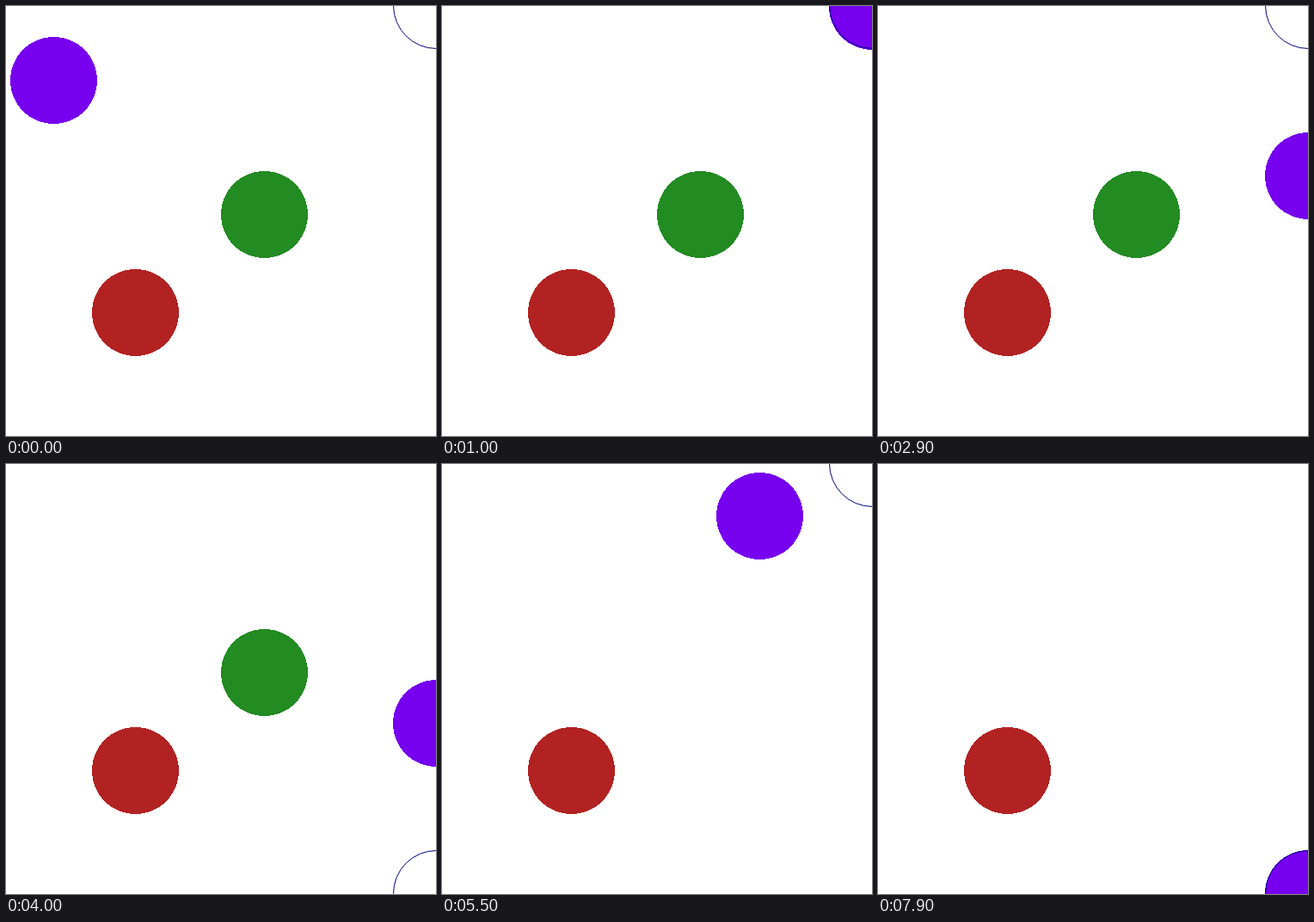
An HTML page for the animation above (8000 ms loop, 500 px wide and 500 px high).

```html
<!DOCTYPE html>
<html>
<head>
<meta charset="utf-8">
<style>
  html, body { margin: 0; width: 100%; height: 100%; overflow: hidden; background: #fff; }
  svg { display: block; shape-rendering: crispEdges; }
  #ring { shape-rendering: geometricPrecision; }
</style>
</head>
<body>
<svg width="500" height="500" viewBox="0 0 500 500">
  <circle cx="150.5" cy="356.5" r="50.5" fill="#b22222"/>
  <circle id="green" cx="300.5" cy="242.5" r="50.5" fill="#228b22"/>
  <circle id="ball" r="50.5" fill="#7700ee"/>
  <circle id="ring" cx="500.5" r="50" fill="none" stroke="#000080"/>
</svg>
<script>
const LOOP = 8000, STEP = 100, RIGHT = 500, BOTTOM = 499;
const [green, ball, ring] = ['green', 'ball', 'ring'].map(id => document.getElementById(id));

// Each run: appear, fly to the top right corner, then swing between the right-hand corners
const first = { x: 55, y: 86, appear: 0, go: 0, flight: 1008, swing: 1174, period: 1101, legs: Infinity };
const second = { x: 81, y: 192, appear: 4300, go: 4600, flight: 1310, swing: 5980, period: 1285, legs: 1 };

const clamp = (v, max) => Math.max(0, Math.min(v, max));

function place(circle, x, y) {
  circle.setAttribute('cx', Math.round(x) + 0.5);
  circle.setAttribute('cy', Math.round(y) + 0.5);
}

function draw(now) {
  const t = Math.floor(now % LOOP / STEP) * STEP;
  const run = t < second.appear ? first : second;

  let p = clamp((t - run.go) / run.flight, 1);
  if (p > 0.98) p = 1; // snap to the corner when close
  const phase = clamp((t - run.swing) / run.period, run.legs);
  const drop = BOTTOM * (1 - Math.cos(Math.PI * phase)) / 2;

  place(ball, run.x + (RIGHT - run.x) * p, run.y * (1 - p) + drop);
  // The ring marks the corner the ball is heading for
  place(ring, RIGHT, Math.ceil(phase) % 2 ? BOTTOM : -1);
  green.setAttribute('visibility', t < second.go ? 'visible' : 'hidden');
}

const start = performance.now();
function tick() {
  draw(performance.now() - start);
  requestAnimationFrame(tick);
}
tick();
</script>
</body>
</html>
```
